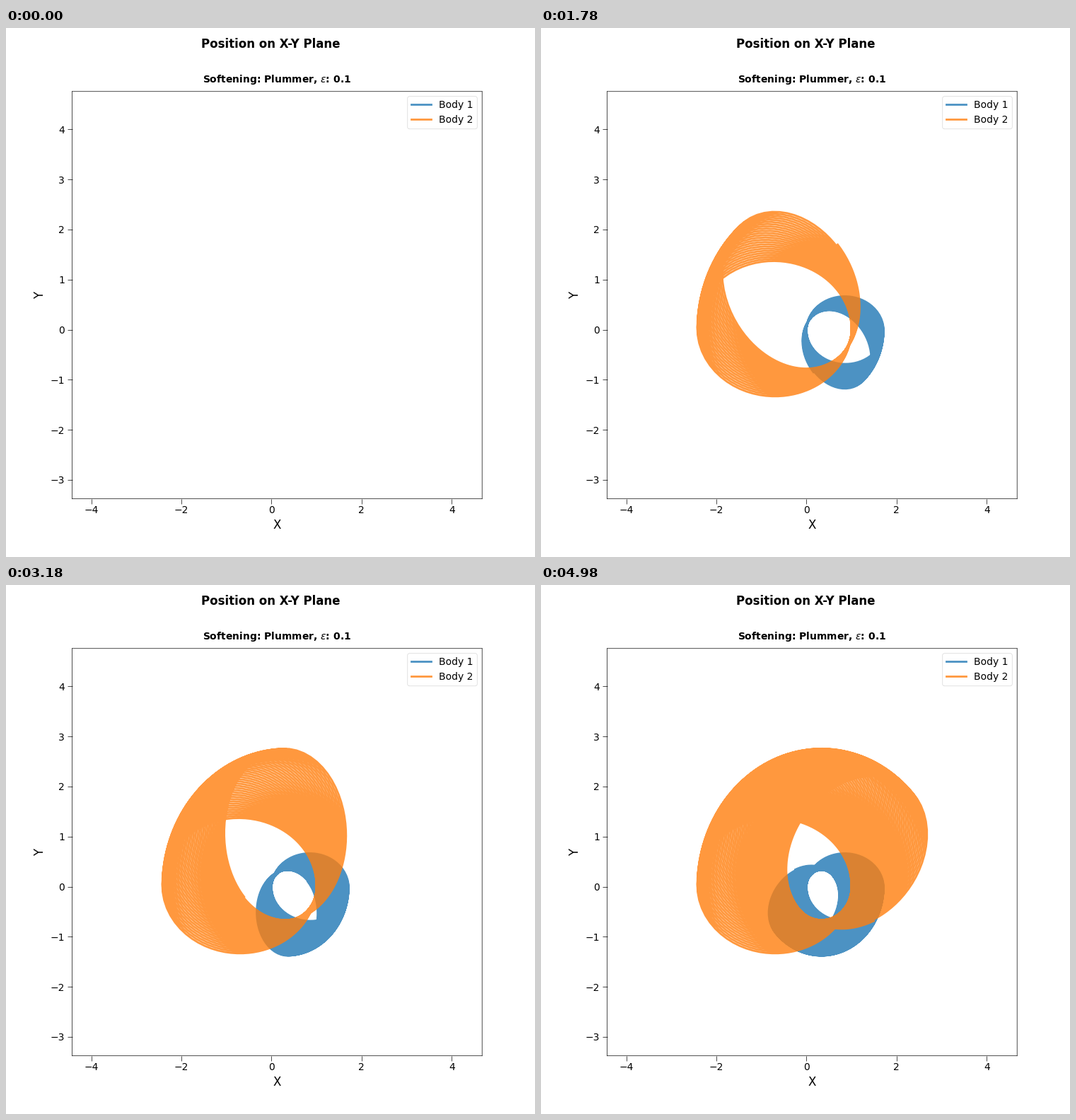
Recreate the animation shown at these times as a matplotlib script. Size 748 px wide and 748 px high, loop 9.63 s.

```python
import math

import matplotlib.pyplot as plt
import numpy as np
from matplotlib.animation import FuncAnimation

SIZE, DPI = 748, 100
INTERVAL, FRAMES = 30, 321      # 9630 ms per loop
STEPS, STEP_MS, FIRST_MS = 50, 100, 80
M1, M2, EPS, ECC = 2.0, 1.0, 0.1, 0.6
DT, PER_STEP = 0.02, 1000       # each picture step adds 20 time units


def orbit():
    """Leapfrog the separation vector, starting at pericentre."""
    mass = M1 + M2
    x, y, vx, vy = 1.0, 0.0, 0.0, math.sqrt(mass * (1 + ECC))

    def kick():
        return -0.5 * DT * mass / (x * x + y * y + EPS * EPS) ** 1.5

    path = [(x, y)]
    k = kick()
    for _ in range(STEPS * PER_STEP):
        vx += k * x
        vy += k * y
        x += DT * vx
        y += DT * vy
        k = kick()
        vx += k * x
        vy += k * y
        path.append((x, y))
    return np.array(path)


def thin(path, turn=0.06):
    """Keep points evenly spaced in angle, plus the end of every step."""
    angle = np.unwrap(np.arctan2(path[:, 1], path[:, 0]))
    keep = np.diff(np.floor(angle / turn), prepend=-1) != 0
    keep[::PER_STEP] = True
    return path[keep], np.cumsum(keep)[::PER_STEP]


sep, ends = thin(orbit())
centre = np.array([M2 / (M1 + M2), 0])
bodies = [centre - sep * M2 / (M1 + M2), centre + sep * M1 / (M1 + M2)]
low = np.min([b.min(axis=0) for b in bodies], axis=0) - 2
high = np.max([b.max(axis=0) for b in bodies], axis=0) + 2

plt.rcParams["font.family"] = "DejaVu Sans"
fig, ax = plt.subplots(figsize=(SIZE / DPI, SIZE / DPI), dpi=DPI)
fig.suptitle("Position on X-Y Plane", y=0.9813, fontsize=12, fontweight="bold")
ax.set_title(r"Softening: Plummer, $\epsilon$: 0.1", fontsize=10,
             fontweight="bold", pad=9)
ax.set_xlabel("X", fontsize=12)
ax.set_ylabel("Y", fontsize=12)
ax.set_xlim(low[0], high[0])
ax.set_ylim(low[1], high[1])
ax.tick_params(axis="x", length=5, width=0.5, pad=1.5)
ax.tick_params(axis="y", length=5, width=0.5, pad=2.5)
lines = [ax.plot([], [], lw=2, alpha=0.8, label=f"Body {i}")[0] for i in (1, 2)]
legend = ax.legend(loc="upper right")
for edge in [*ax.spines.values(), legend.get_frame()]:
    edge.set_linewidth(0.5)
    edge.set_snap(False)


def update(i):
    ms = i * INTERVAL + 20
    step = min(max((ms - FIRST_MS) // STEP_MS + 1, 0), STEPS)
    n = ends[step] if step else 0
    for line, body in zip(lines, bodies):
        line.set_data(body[:n, 0], body[:n, 1])
    return lines


anim = FuncAnimation(fig, update, frames=FRAMES, interval=INTERVAL,
                     repeat=True, repeat_delay=0)
plt.show()
```
